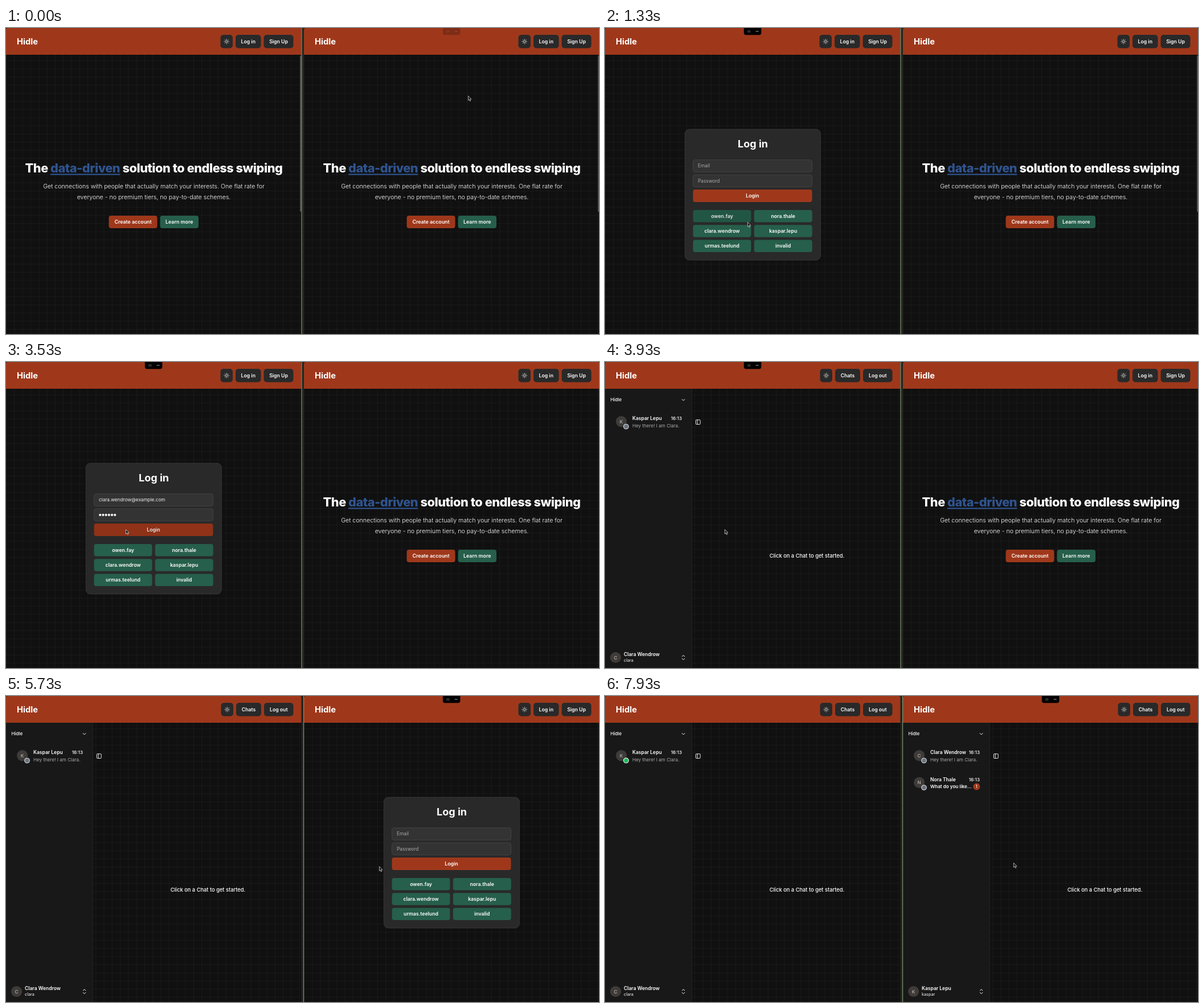
Write an HTML page that moves like this. It is 1041 by 538 pixels and loops after 8 s.

```html
<!DOCTYPE html>
<html lang="en">
<head>
<meta charset="utf-8">
<title>Two browser windows</title>
<style>
  html, body { margin: 0; width: 100%; height: 100%; overflow: hidden; background: #0c0c0b; }
  svg { display: block; width: 100%; height: 100%; }
  text { font-family: Inter, Roboto, sans-serif; font-optical-sizing: none; white-space: pre; }
  .btn { transform-box: fill-box; transform-origin: center; }
  .btn.nav.hover { transform: scale(1.05); }
  .btn.cta.hover { filter: brightness(.9); }
</style>
</head>
<body>
<svg id="stage" viewBox="0 0 1041 538" preserveAspectRatio="none"></svg>
<script>
const LOOP = 8000, PANE_X = 523, PANE_W = 518.5;
const RUST = '#9f381b', GREEN = '#265f4b', PANEL = '#292929';
const BRAND = 'Hidle';
const clara = { name: 'Clara Wendrow', nick: 'clara', login: 'clara.wendrow' };
const kaspar = { name: 'Kaspar Lepu', nick: 'kaspar', login: 'kaspar.lepu' };
const nora = { name: 'Nora Thale' };
const accounts = ['owen.fay', 'nora.thale', clara.login, kaspar.login, 'urmas.teelund', 'invalid'];

const text = (x, y, s, size, weight = 500, fill = '#fff', anchor = 'start', more = '') =>
  `<text x="${x}" y="${y}" font-size="${size}" font-weight="${weight}" fill="${fill}" text-anchor="${anchor}" ${more}>${s}</text>`;
const box = (x, y, w, h, fill, r = 0, more = '') =>
  `<rect x="${x}" y="${y}" width="${w}" height="${h}" rx="${r}" fill="${fill}" ${more}/>`;
const dot = (x, y, r, fill, more = '') => `<circle cx="${x}" cy="${y}" r="${r}" fill="${fill}" ${more}/>`;
const line = (d, width = 1, color = '#fff') =>
  `<path d="${d}" fill="none" stroke="${color}" stroke-width="${width}" stroke-linecap="round" stroke-linejoin="round"/>`;
const part = (id, content) => `<g id="${id}">${content}</g>`;

function button(kind, x, y, w, h, label, fill, size = 8.8) {
  const body = label === 'sun' ? sun(x + w / 2, y + h / 2)
    : text(x + w / 2, y + h / 2 + size * .36, label, size, 600, '#fff', 'middle');
  return `<g class="btn ${kind}" data-rect="${[x, y, w, h]}">${box(x, y, w, h, fill, kind === 'nav' ? 5 : 4)}${body}</g>`;
}

function sun(x, y) {
  let rays = '';
  for (let a = 0; a < 8; a++) {
    const c = Math.cos(a * Math.PI / 4), s = Math.sin(a * Math.PI / 4);
    rays += `M${x + c * 3.3} ${y + s * 3.3}L${x + c * 4.2} ${y + s * 4.2}`;
  }
  return dot(x, y, 1.8, 'none', 'stroke="#fff" stroke-width=".8"') + line(rays, .8);
}

const navButton = (x, w, label) => button('nav', x, 12, w, 23.5, label, PANEL, 8.7);
const guestNav = () => navButton(376.5, 21.5, 'sun') + navButton(403, 44.5, 'Log in') + navButton(452.5, 52, 'Sign Up');
const userNav = () => navButton(377.5, 21.5, 'sun') + navButton(404, 44, 'Chats') + navButton(453, 51.5, 'Log out');

function hero() {
  const title = 'The <tspan fill="#2f5490" text-decoration="underline">data-driven</tspan> solution to endless swiping';
  return text(259.5, 254.3, title, 21.7, 800, '#fff', 'middle', 'letter-spacing="-.02em"') +
    text(259.5, 281.5, 'Get connections with people that actually match your interests. One flat rate for', 10.6, 300, '#fff', 'middle') +
    text(259.5, 300.5, 'everyone - no premium tiers, no pay-to-date schemes.', 10.6, 300, '#fff', 'middle') +
    button('cta', 180.5, 330, 85, 22, 'Create account', RUST) +
    button('cta', 270.5, 330, 67.5, 22, 'Learn more', GREEN);
}

function login(id, user) {
  const field = y => box(154.5, y, 209, 21.5, '#333', 4, 'stroke="#484848" stroke-width=".8"');
  let dots = '';
  for (let i = 0; i < 6; i++) dots += dot(165.2 + i * 5.2, 268.9, 2.1, '#f2f2f2');
  return box(140.3, 178, 238, 230, PANEL, 8, 'stroke="#3d3d3d" stroke-width=".8"') +
    text(259.5, 209.6, 'Log in', 18, 700, '#fff', 'middle') + field(231.8) + field(258) +
    part(id + 'Empty', text(163, 245.4, 'Email', 8.3, 400, '#aaa') + text(163, 271.6, 'Password', 8.3, 400, '#aaa')) +
    part(id + 'Filled', text(163, 245.4, user.login + '@example.com', 8.2, 400, '#f2f2f2') + dots) +
    button('cta', 154.5, 284, 209, 22, 'Login', RUST) +
    accounts.map((name, i) => button('cta', i % 2 ? 261.7 : 154.5, 320 + 26.2 * (i >> 1), 102, 21.5, name, GREEN, 8.7)).join('');
}

const avatar = (x, y, name) => dot(x, y, 9.6, '#3e3b39') + text(x, y + 3, name[0], 8.2, 500, '#b8b3b0', 'middle');
const status = (y, color) => dot(37, y, 4.3, color, 'stroke="#e4e6ea" stroke-width="1.1"');

function chatRow(y, name, message, unread) {
  return avatar(28.6, y, name) + status(y + 8.9, '#6a717d') +
    text(48, y - 2.2, name, 8.5, 600) + text(135, y - 2.2, '16:13', 8.1, 500, '#fff', 'end') +
    text(48, y + 10.3, message, 8.1, unread ? 600 : 400, unread ? '#fff' : '#a9a9a9') +
    (unread ? dot(129.3, y + 55 - 47.5 - .2 + .0, 6.1, RUST) + text(129.3, y + 10, '1', 7, 500, '#fff', 'middle') : '');
}

function chat(id, user, rows) {
  return box(0, 47, 152.5, 491, '#181818') + box(152.2, 47, .8, 491, '#262626') +
    text(9.5, 69.4, BRAND, 8.1) + line('M135.2 65.5l2.4 2.4 2.4-2.4') + rows +
    part(id + 'Online', status(113.4, '#18bb55')) +
    box(159.4, 101.8, 7.8, 7.8, 'none', 1, 'stroke="#fff" stroke-width=".9"') + line('M162.2 102v7.4', .9) +
    text(354.5, 344.2, 'Click on a Chat to get started.', 9.3, 500, '#fff', 'middle') +
    avatar(18.6, 519.5, user.name) + text(33, 517.4, user.name, 8.5, 600) + text(33, 527, user.nick, 7.3, 400) +
    line('M135.4 517.8l2.2-2.2 2.2 2.2M135.4 521.4l2.2 2.2 2.2-2.2');
}

function handle() {
  let grip = '';
  for (let i = 0; i < 6; i++) grip += box(250.4 + (i % 3) * 1.9, 4.5 + (i > 2 ? 2.1 : 0), 1, 1, '#aaa');
  return box(243.8, -5, 30.6, 17.2, '#000', 4) + grip + box(264.6, 5.4, 5, 1, '#aaa');
}

function pane(id, dx, user, rows) {
  return `<g transform="translate(${dx})" data-dx="${dx}">` +
    box(0, 0, PANE_W, 538, '#101010', 3) + box(0, 47, PANE_W, 491, 'url(#grid)') +
    `<path d="M0 47V3Q0 0 3 0H${PANE_W - 3}Q${PANE_W} 0 ${PANE_W} 3V47Z" fill="${RUST}"/>` +
    text(19, 28.7, BRAND, 14.7, 700) +
    part(id + 'Guest', guestNav()) + part(id + 'User', userNav()) +
    part(id + 'Hero', hero()) + part(id + 'Login', login(id, user)) + part(id + 'Chat', chat(id, user, rows)) +
    part(id + 'Scroll', box(516.4, 48.5, 1.8, 274.5, '#626262', .9)) +
    part(id + 'Handle', handle()) + '</g>';
}

const greeting = 'Hey there! I am Clara.';
const stage = document.getElementById('stage');
stage.innerHTML = `<defs><pattern id="grid" width="14.3" height="14.3" patternUnits="userSpaceOnUse">
    <path d="M0 .4H14.3M.4 0V14.3" stroke="#fff" stroke-opacity=".05" stroke-width=".8"/></pattern></defs>` +
  box(518.5, 0, 4.5, 538, '#242621') +
  pane('left', 0, clara, chatRow(104.6, kaspar.name, greeting)) +
  pane('right', PANE_X, kaspar, chatRow(104.6, clara.name, greeting) + chatRow(152.1, nora.name, 'What do you like…', true)) +
  part('leftFocus', box(518.4, 0, 1.1, 538, '#869c7c')) + part('rightFocus', box(522, 0, 1.1, 538, '#7d9c74')) +
  part('cursor',
    part('arrow', '<path d="M.4.4V8.2L2.2 6.6 3.5 9.5 4.7 9 3.5 6.1H5.9Z" fill="#111" stroke="#e8e8e8" stroke-width=".7" stroke-linejoin="round"/>') +
    part('hand', '<path d="M1.5 1Q2.5 0 3 1.2L3.8 3.4Q6.5 2.6 7.2 4.2L7.8 6.8 6.9 9H3.6L.5 6Q.3 4.9 1.4 5.2L2.4 5.7Z" fill="#111" stroke="#f2f2f2" stroke-width=".8" stroke-linejoin="round"/>'));

// Pointer stops: time, x, y
const path = [
  [70, 811, 119], [870, 418, 22], [930, 418, 22], [1330, 250, 341], [1730, 250, 341], [2330, 197.5, 365],
  [2500, 197.5, 365], [2730, 238, 360], [3000, 238, 360], [3330, 210, 294], [4070, 210, 294], [4530, 985, 26],
  [4800, 947, 23], [5130, 947, 23], [5470, 650, 298], [5700, 650, 298], [6000, 818, 343], [6170, 818, 343],
  [6330, 818, 360], [6670, 818, 360], [6920, 717, 293], [LOOP, 717, 293]
];
const ease = k => k * k * (3 - 2 * k);
const ramp = (t, from, to) => Math.min(1, Math.max(0, (t - from) / (to - from)));

function pointer(t) {
  const i = Math.max(1, path.findIndex(p => p[0] > t));
  const [a, b] = [path[i - 1], path[i]], k = ease(ramp(t, a[0], b[0]));
  return [a[1] + (b[1] - a[1]) * k, a[2] + (b[2] - a[2]) * k];
}

const el = id => document.getElementById(id);
const show = (id, on) => { el(id).style.display = on ? '' : 'none'; };
const fade = (id, value) => { el(id).style.opacity = value; };

const buttons = [...document.querySelectorAll('.btn')].map(node => ({
  node, rect: node.dataset.rect.split(',').map(Number),
  dx: +node.closest('[data-dx]').dataset.dx, scene: node.parentNode
}));

function showPane(id, t, loginAt, fillAt, chatAt) {
  show(id + 'Guest', t < chatAt);
  show(id + 'User', t >= chatAt);
  show(id + 'Hero', t < loginAt);
  show(id + 'Login', t >= loginAt && t < chatAt);
  show(id + 'Chat', t >= chatAt);
  show(id + 'Empty', t < fillAt);
  show(id + 'Filled', t >= fillAt);
}

function draw(t) {
  showPane('left', t, 1000, 3040, 3600);
  showPane('right', t, 5190, 6670, 7670);
  show('leftOnline', t >= 7800);
  show('rightOnline', false);

  fade('leftScroll', 1 - ramp(t, 500, 800));
  fade('rightScroll', t < 4000 ? 1 - ramp(t, 3060, 3300) : t < 5190 ? ramp(t, 4250, 4400) : 0);
  const focusRight = t >= 4400;
  show('leftFocus', !focusRight);
  show('rightFocus', focusRight);
  fade('leftHandle', ramp(t, 70, 210) * (1 - ramp(t, 4330, 4470)));
  fade('rightHandle', t < 1000 ? .2 * (1 - ramp(t, 0, 140)) : ramp(t, 4330, 4470));

  const [x, y] = pointer(t);
  let onNav = false;
  for (const { node, rect: [bx, by, w, h], dx, scene } of buttons) {
    const hit = scene.style.display !== 'none' && x >= bx + dx && x <= bx + dx + w && y >= by && y <= by + h;
    node.classList.toggle('hover', hit);
    if (hit && node.classList.contains('nav')) onNav = true;
  }
  el('cursor').setAttribute('transform', `translate(${x} ${y})`);
  show('arrow', !onNav);
  show('hand', onNav);
}

function tick() {
  draw(performance.now() % LOOP);
  requestAnimationFrame(tick);
}
tick();
</script>
</body>
</html>
```
